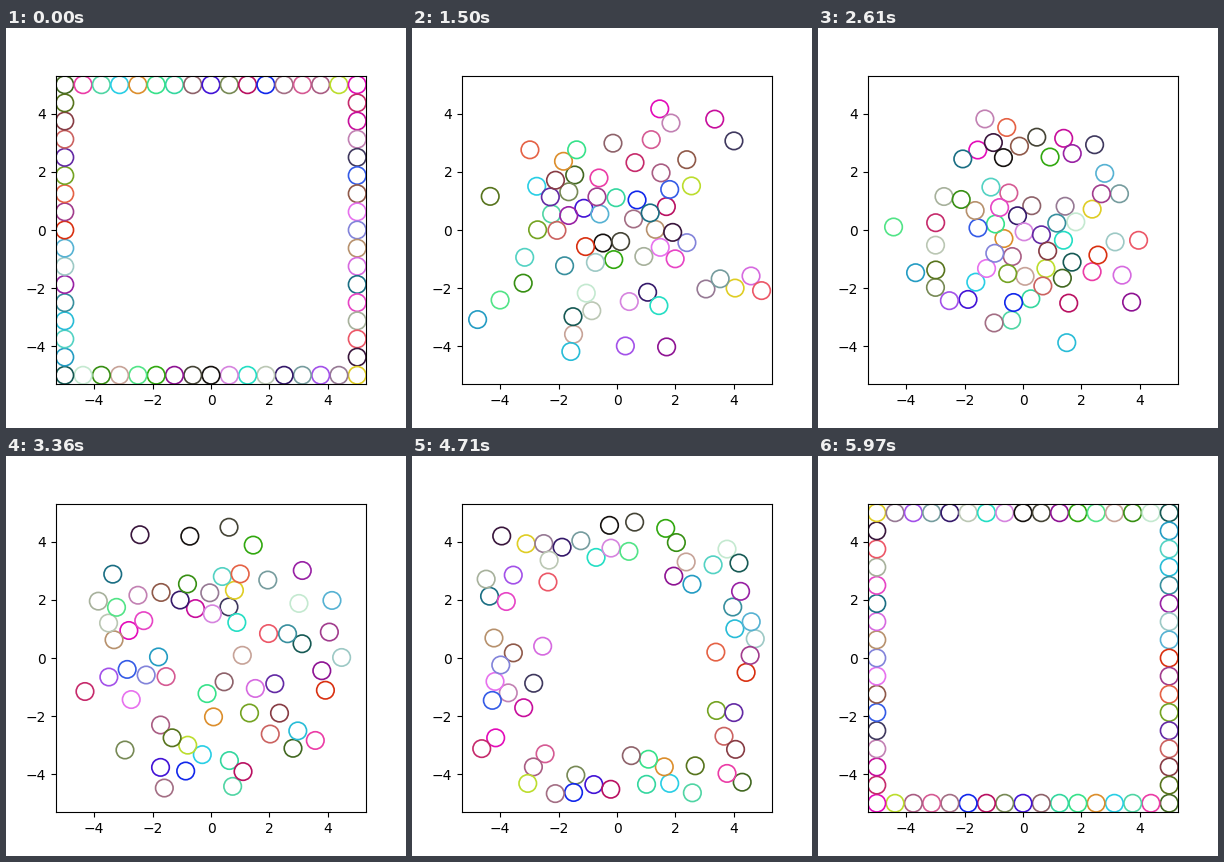
Animation, 400 px wide and 400 px high, one loop 6000 ms. Source, as a matplotlib script:

```python
import numpy as np
import matplotlib.pyplot as plt
from matplotlib.animation import FuncAnimation
from matplotlib.patches import Circle

FRAMES, INTERVAL = 200, 30
PER_SIDE = 16
COUNT = 4 * PER_SIDE
HALF, RADIUS = 5, 0.3
TAU = 2 * np.pi

rng = np.random.default_rng(7)


def perimeter():
    """Evenly spaced points around the square, clockwise."""
    run = -HALF + 2 * HALF * np.arange(PER_SIDE) / PER_SIDE
    edge = np.full(PER_SIDE, HALF)
    sides = [(run, edge), (edge, -run), (-run, -edge), (-edge, run)]
    return np.concatenate([np.column_stack(s) for s in sides])


def pick_mids(starts, reach=4.3, scatter=1.3):
    """Spread halfway points over a disc, loosely ahead of each robot."""
    k = np.arange(COUNT)
    angle = k * TAU * (np.sqrt(5) - 1) / 2 % TAU
    radius = reach * np.sqrt((k + 0.5) / COUNT)
    disc = np.column_stack([radius * np.cos(angle), radius * np.sin(angle)])

    heading = np.arctan2(-starts[:, 1], -starts[:, 0])
    heading = (heading + rng.normal(0, scatter, COUNT)) % TAU
    mids = np.empty_like(disc)
    mids[np.argsort(heading)] = disc[np.argsort(angle)]
    return mids


def separate(paths, rounds=30):
    """Ease overlapping robots apart, smoothly in time."""
    for _ in range(rounds):
        gap = paths[:, :, None] - paths[:, None]
        dist = np.sqrt((gap ** 2).sum(-1))
        overlap = np.clip(2 * RADIUS - dist, 0, None)
        weight = 0.3 * overlap / np.maximum(dist, 0.05)
        push = (gap * weight[..., None]).sum(2)
        for _ in range(4):
            push[1:-1] = (push[:-2] + 2 * push[1:-1] + push[2:]) / 4
        paths[1:-1] += push[1:-1]
        paths = np.clip(paths, -HALF, HALF)
    return paths


def plan():
    """Every robot crosses to the opposite point, bowing through its mid."""
    t = np.linspace(0, 1, FRAMES)[:, None, None]
    ease = t - np.sin(TAU * t) / 20
    bow = np.sin(np.pi * t ** 0.9) ** 2
    starts = perimeter()
    return separate(starts * (1 - 2 * ease) + pick_mids(starts) * bow)


paths = plan()
colors = rng.uniform(0.04, 0.95, (COUNT, 3))

fig, ax = plt.subplots(figsize=(4, 4), dpi=100)
ax.set_xlim(-HALF - RADIUS, HALF + RADIUS)
ax.set_ylim(-HALF - RADIUS, HALF + RADIUS)
ax.set_xticks(range(-4, 5, 2))
ax.set_yticks(range(-4, 5, 2))

robots = [ax.add_patch(Circle(p, RADIUS, fill=False, ec=c, lw=1.2))
          for p, c in zip(paths[0], colors)]


def update(i):
    for robot, pos in zip(robots, paths[i]):
        robot.center = pos
    return robots


anim = FuncAnimation(fig, update, frames=FRAMES, interval=INTERVAL,
                     init_func=lambda: update(0), repeat=True, repeat_delay=0)
plt.show()
```
